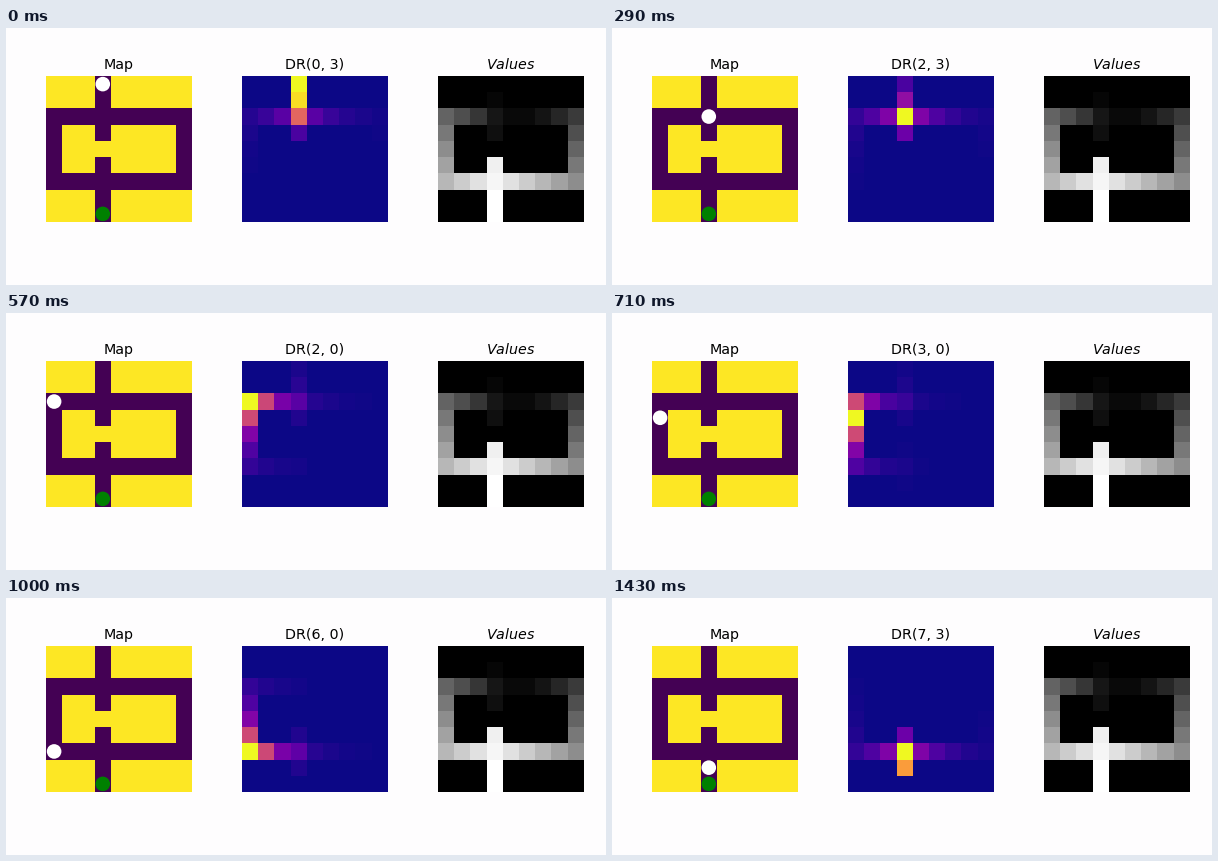
Animation of 600 by 257 pixels, one loop 1.57 s. Source, as a matplotlib script:

```python
import numpy as np
import matplotlib.pyplot as plt
from matplotlib.animation import FuncAnimation
from matplotlib.patches import Circle

WIDTH, HEIGHT, DPI = 600, 257, 100
N = 9
PANEL, TOP = 146, 48
SCALE = 6 / 7
STEP_COST = 0.207
GOAL = (8, 3)
TICK_MS, TICKS = 10, 157

plt.rcParams["font.family"] = "DejaVu Sans"
plt.rcParams["mathtext.fontset"] = "dejavusans"


def build_maze():
    """True marks a walkable cell."""
    maze = np.zeros((N, N), bool)
    maze[:, 3] = True
    maze[4, 3] = False
    maze[[2, 6], :] = True
    maze[2:7, [0, 8]] = True
    return maze


def default_representation(cells):
    """Discounted visits of a random walk between the given cells."""
    points = np.array(cells)
    distance = np.abs(points[:, None] - points[None]).sum(axis=2)
    adjacent = (distance == 1).astype(float)
    transition = adjacent / adjacent.sum(axis=1, keepdims=True)
    return np.linalg.inv(np.exp(STEP_COST) * np.eye(len(cells)) - transition)


def to_grid(numbers, fill):
    grid = np.full((N, N), float(fill))
    for cell, number in zip(cells, numbers):
        grid[cell] = number
    return grid


maze = build_maze()
cells = [tuple(map(int, c)) for c in np.argwhere(maze) if tuple(c) != GOAL]
dr = default_representation(cells)

log_value = np.log(dr[:, cells.index((7, 3))])
value_top = log_value[cells.index((6, 3))] + 0.3
values = to_grid(log_value, log_value.min())
values[GOAL] = value_top

# Down the stem, along the upper corridor, down the left side and back.
path = ([(r, 3) for r in range(3)] + [(2, c) for c in (2, 1, 0)]
        + [(r, 0) for r in range(3, 7)] + [(6, c) for c in (1, 2, 3)] + [(7, 3)])

fig = plt.figure(figsize=(WIDTH / DPI, HEIGHT / DPI), dpi=DPI, facecolor="#fefdfe")


def add_panel(left, title, grid, cmap, vmin, vmax):
    ax = fig.add_axes([left / WIDTH, 1 - (TOP + PANEL) / HEIGHT,
                       PANEL / WIDTH, PANEL / HEIGHT])
    image = ax.imshow(grid, cmap=cmap, vmin=vmin, vmax=vmax,
                      interpolation="nearest", aspect="auto")
    label = ax.set_title(title, fontsize=12 * SCALE, pad=6 * SCALE)
    ax.axis("off")
    return ax, image, label


def add_disc(ax, cell, color):
    return ax.add_patch(Circle(cell[::-1], 0.45, facecolor=color, edgecolor="none"))


map_ax, _, _ = add_panel(40, "Map", ~maze, "viridis", 0, 1)
_, dr_image, dr_title = add_panel(236, "DR", np.zeros((N, N)), "plasma", 0, 1)
add_panel(432, "$Values$", values, "gray", log_value.min(), value_top)
add_disc(map_ax, GOAL, "green")
agent = add_disc(map_ax, path[0], "white")


def update(tick):
    # Seven pictures per second, sampled from a walk of ten steps per second.
    shot = (2 * tick + 1) * 7 // 200
    step = max(0, int(np.floor(shot * 10 / 7 - 0.35)))
    row, col = path[step]
    visits = dr[cells.index((row, col))]
    dr_image.set_data(to_grid(visits / visits.max(), 0))
    dr_title.set_text(f"DR({row}, {col})")
    agent.center = (col, row)
    return dr_image, dr_title, agent


anim = FuncAnimation(fig, update, frames=TICKS, interval=TICK_MS,
                     init_func=lambda: update(0), repeat=True, repeat_delay=0)
plt.show()
```
